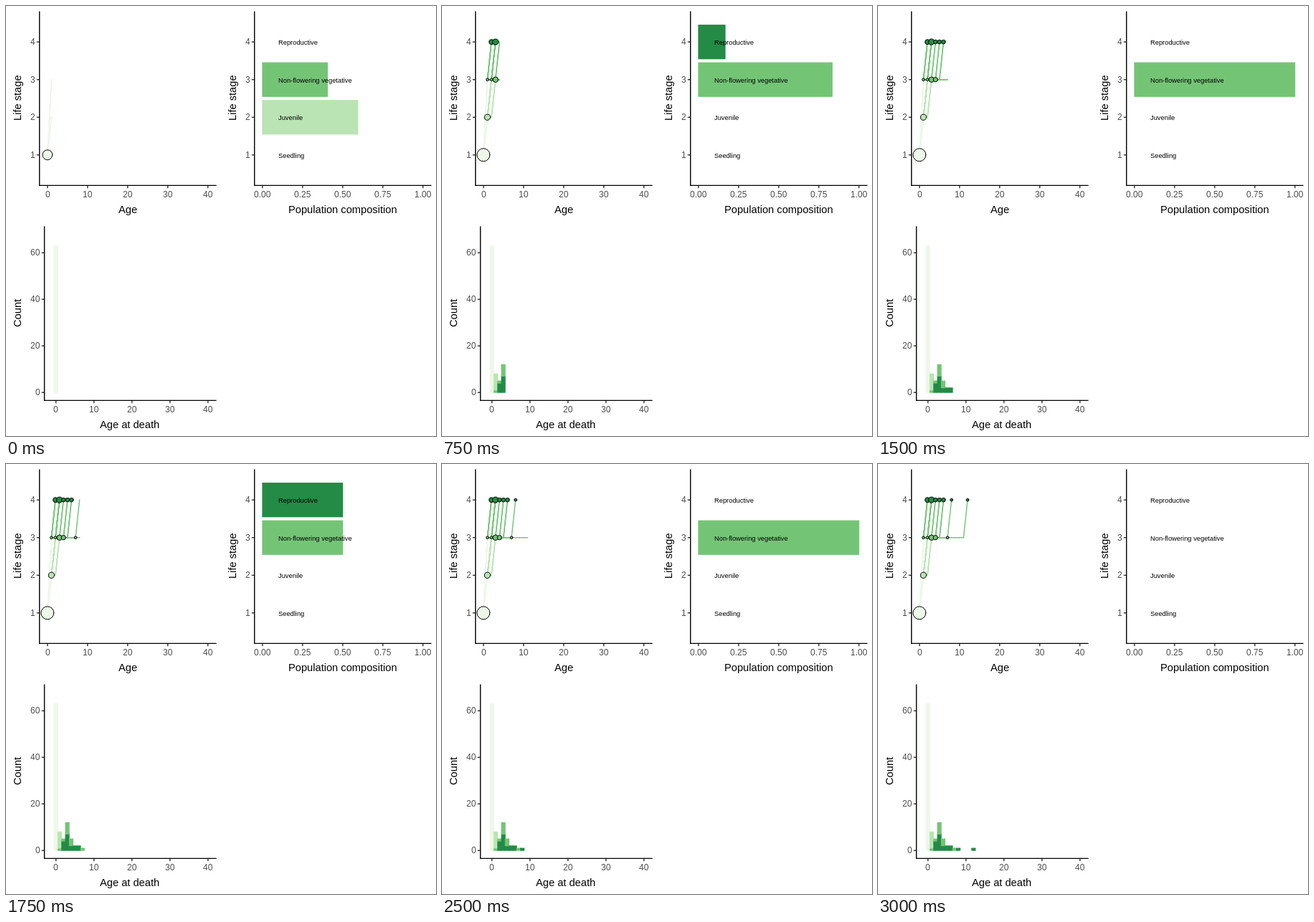
An HTML page with a canvas that plays this animation: 600x600 px, repeating every 10 s.

```html
<!DOCTYPE html>
<html lang="en">
<head>
<meta charset="utf-8">
<title>Life stages of a cohort</title>
<style>
  html, body { margin: 0; width: 100%; height: 100%; overflow: hidden; background: #fff; }
  canvas { display: block; width: 600px; height: 600px; }
</style>
</head>
<body>
<canvas id="stage" width="600" height="600"></canvas>
<script>
const ctx = document.getElementById('stage').getContext('2d');
const FONT = '"Liberation Sans", Arial, sans-serif';
const STEP = 250, LOOP = 10000, LAST = 12;
const LINE = 1.42, EDGE = 0.45;
const [SEED, JUV, VEG, REP] = [1, 2, 3, 4];
const GREENS = [null, '#edf8e9', '#bae4b3', '#74c476', '#238b45'];
const STAGES = ['Seedling', 'Juvenile', 'Non-flowering vegetative', 'Reproductive'];

// Follows 100 seedlings: plants die, stay or grow each year, and die after flowering.
function simulate() {
  const flowering = [0, 4, 7, 2, 2, 2, 0, 1, 0, 0, 0, 1];
  const vegLosses = [0, 1, 1, 5, 3, 0, 0, 1];
  const moves = [], deaths = [];
  const move = (age, from, to, n) => n && moves.push({ age, from, to, n });
  const die = (age, stage, n) => n && deaths.push({ age, stage, n });

  const lost = 63, survivors = 100 - lost;
  let veg = Math.round(survivors * 0.4), juv = survivors - veg, rep = 0;
  die(0, SEED, lost);
  move(0, SEED, VEG, veg);
  move(0, SEED, JUV, juv);

  for (let age = 1; age <= LAST; age++) {
    const vegLost = vegLosses[age] || 0;
    const juvLost = Math.floor(juv * 0.33);
    die(age, REP, rep);
    die(age, VEG, vegLost);
    die(age, JUV, juvLost);

    const juvLeft = juv - juvLost;
    juv = Math.floor(juvLeft / 5);
    rep = flowering[age] || 0;
    const grown = juvLeft - juv, staying = veg - vegLost - rep;
    move(age, JUV, JUV, juv);
    move(age, JUV, VEG, grown);
    move(age, VEG, VEG, staying);
    move(age, VEG, REP, rep);
    veg = grown + staying;
  }
  return { moves, deaths };
}
const { moves, deaths } = simulate();

const ageX = a => 57.85 + 5.595 * a;
const stageY = s => 50.15 + 52.55 * (4 - s);
const shareX = p => 357.8 + 224 * p;
const deathX = a => 69.67 + 5.304 * a;
const countY = n => 539.3 - 3.249 * n;

// Text starts on whole pixels; align is the share of its width left of x.
function text(str, x, y, size, color, align = 0.5) {
  ctx.font = `${size}px ${FONT}`;
  ctx.fillStyle = color;
  const left = x - ctx.measureText(str).width * align;
  ctx.fillText(str, Math.round(left), Math.round(y));
}

function line(x1, y1, x2, y2, color, cap = 'butt') {
  ctx.strokeStyle = color;
  ctx.lineWidth = LINE;
  ctx.lineCap = cap;
  ctx.beginPath();
  ctx.moveTo(x1, y1);
  ctx.lineTo(x2, y2);
  ctx.stroke();
}

// A bar includes the outer half of its thin outline.
function bar(x1, y1, x2, y2, color) {
  ctx.fillStyle = color;
  ctx.fillRect(x1 - EDGE, y1 - EDGE, x2 - x1 + 2 * EDGE, y2 - y1 + 2 * EDGE);
}

function axes({ left, right, top, xs, ys, mapX, mapY, xTitle, yTitle, digits = 0 }) {
  const bottom = top + 243;
  for (const v of xs) {
    const x = mapX(v);
    line(x, bottom, x, bottom + 3.9, '#333');
    text(v.toFixed(digits), x, bottom + 16.7, 12, '#4d4d4d');
  }
  for (const v of ys) {
    const y = mapY(v);
    line(left - 3.9, y, left, y, '#333');
    text(v, left - 6.2, y + 4.1, 12, '#4d4d4d', 1);
  }
  line(left, top, left, bottom + LINE / 2, '#000');
  line(left - LINE / 2, bottom, right, bottom, '#000');
  text(xTitle, (left + right) / 2 - 0.6, bottom + 38.7, 14.67, '#000');

  ctx.save();
  ctx.translate(left < 300 ? 21 : 321, Math.round(top + 121));
  ctx.rotate(-Math.PI / 2);
  text(yTitle, 0, 0, 14.67, '#000');
  ctx.restore();
}

function drawPaths(step) {
  for (const { age, from, to, n } of moves) {
    if (age > step) continue;
    // One stroke per plant, so that soft edges build up
    for (let i = 0; i < n; i++) {
      line(ageX(age), stageY(from), ageX(age + 1), stageY(to), GREENS[from], 'square');
    }
  }
  for (const { age, stage, n } of deaths) {
    if (age > step) continue;
    const part = step ? (n - 1) / 62 : 0.5;
    const size = 1 + 5 * Math.sqrt(part);
    ctx.beginPath();
    ctx.arc(ageX(age), stageY(stage), (size * 2.845 + 0.945) / 2, 0, 2 * Math.PI);
    ctx.fillStyle = GREENS[stage];
    ctx.fill();
    ctx.strokeStyle = '#000';
    ctx.lineWidth = 1;
    ctx.stroke();
  }
}

function drawShares(step) {
  const next = moves.filter(m => m.age === step);
  const sum = list => list.reduce((total, m) => total + m.n, 0);
  STAGES.forEach((name, i) => {
    const s = i + 1, y = stageY(s);
    const alive = sum(next.filter(m => m.to === s));
    if (alive) bar(shareX(0), y - 23.67, shareX(alive / sum(next)), y + 23.67, GREENS[s]);
    text(name, shareX(0.1) - 0.3, y + 3.9, 9.33, '#000', 0);
  });
}

function drawDeaths(step) {
  const stacked = {};
  for (const { age, stage, n } of deaths) {
    if (age > step) continue;
    const base = stacked[age] || 0;
    stacked[age] = base + n;
    bar(deathX(age - 0.5), countY(base + n), deathX(age + 0.5), countY(base), GREENS[stage]);
  }
}

function draw(step) {
  ctx.fillStyle = '#fff';
  ctx.fillRect(0, 0, 600, 600);
  drawPaths(step);
  drawShares(step);
  drawDeaths(step);
  const range = (n, gap, first = 0) => Array.from({ length: n }, (_, i) => first + i * gap);
  const ages = range(5, 10), stages = range(4, 1, 1);
  axes({ left: 46.7, right: 293.6, top: 7.4, xs: ages, ys: stages,
    mapX: ageX, mapY: stageY, xTitle: 'Age', yTitle: 'Life stage' });
  axes({ left: 346.7, right: 593.6, top: 7.4, xs: range(5, 0.25), ys: stages,
    mapX: shareX, mapY: stageY, xTitle: 'Population composition', yTitle: 'Life stage', digits: 2 });
  axes({ left: 53.6, right: 293.6, top: 307.4, xs: ages, ys: range(4, 20),
    mapX: deathX, mapY: countY, xTitle: 'Age at death', yTitle: 'Count' });
}

const start = performance.now();
let shown = -1;

function tick() {
  const time = (performance.now() - start) % LOOP;
  const step = Math.min(LAST, Math.floor(time / STEP));
  if (step !== shown) draw(shown = step);
  requestAnimationFrame(tick);
}
tick();
</script>
</body>
</html>
```
